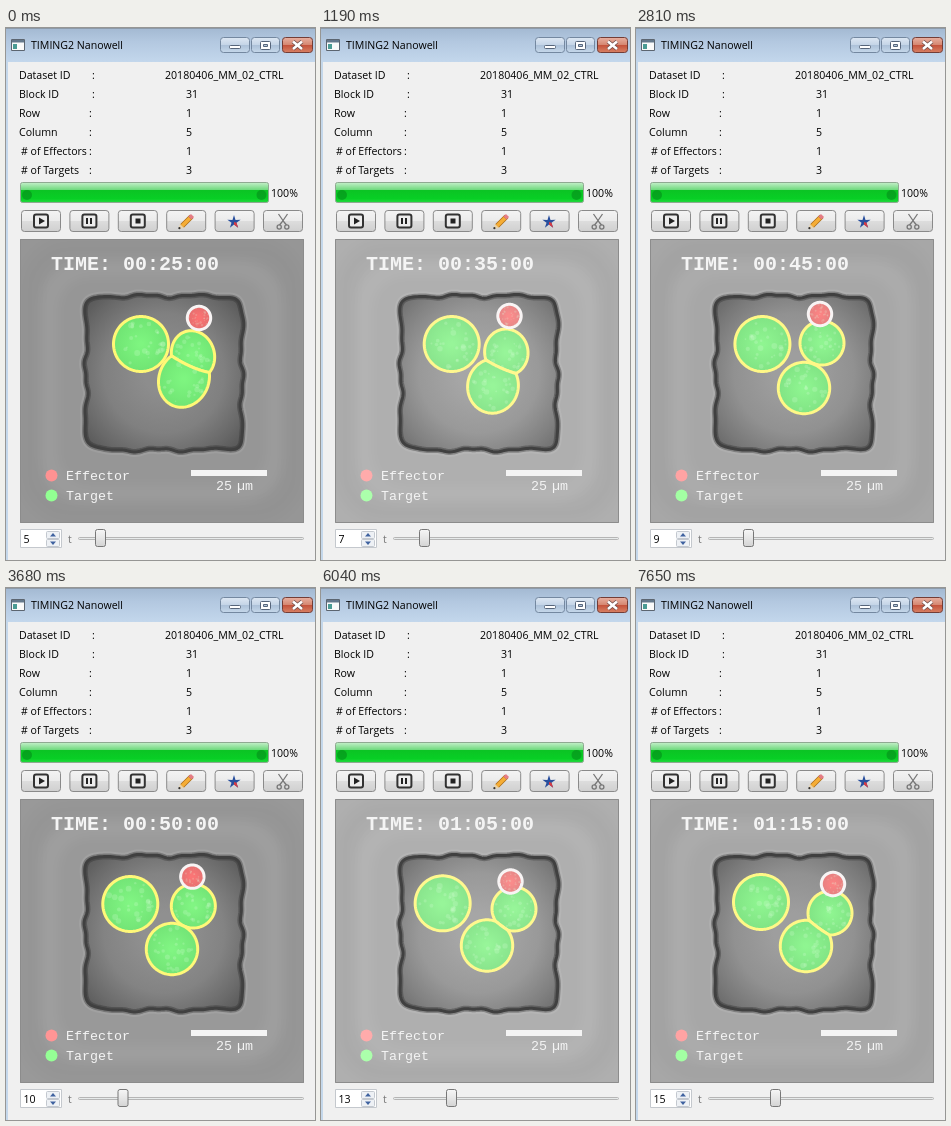
Write an HTML page with a canvas that moves like this. It is 309x532 px and loops after 8000 ms.

```html
<!DOCTYPE html>
<html lang="en">
<head>
<meta charset="utf-8">
<title>Nanowell viewer</title>
<style>
  html, body { margin: 0; width: 100%; height: 100%; overflow: hidden; background: #f0f0f0; }
  canvas { display: block; width: 309px; height: 532px; }
</style>
</head>
<body>
<canvas id="stage"></canvas>
<script>
const W = 309, H = 532, LOOP = 8000;
const canvas = document.getElementById('stage');
const ctx = canvas.getContext('2d');
const ratio = window.devicePixelRatio || 1;
canvas.width = W * ratio;
canvas.height = H * ratio;

const UI = '10.6px "Open Sans", sans-serif';
const mono = (size, weight = '') => `${weight} ${size}px "Liberation Mono", monospace`;

// Playback starts inside t = 5, then alternates a short and a long hold.
const FIRST_T = 5, FIRST_HOLD = 450, SHORT_HOLD = 740, PAIR = 1615;

// Cells drift along waypoints [t, x, y]; tilt is the lean while pressed together.
const targets = [
  { r: 27.5, tilt: 0, path: [[5, 135, 316], [12, 120, 316], [15, 125, 314]] },
  { r: 22, tilt: -18, path: [[5, 187, 327], [6, 185, 329], [9, 186, 315], [12, 190, 324], [14, 196, 318], [15, 194, 325]] },
  { r: 25.7, tilt: 22, path: [[5, 178, 351], [6, 174, 357], [12, 162, 363], [14, 170, 352], [15, 170, 358]] }
];
const effector = { r: 11.7, tilt: 0, path: [[5, 193, 290], [9, 184, 286], [12, 191, 294], [14, 188, 293], [15, 197, 296]] };

const clamp01 = v => Math.min(1, Math.max(0, v));

function along(path, t) {
  const i = path.findIndex(p => p[0] >= t);
  if (i < 1) return path.at(i).slice(1);
  const [a, b] = [path[i - 1], path[i]], u = (t - a[0]) / (b[0] - a[0]);
  return [a[1] + (b[1] - a[1]) * u, a[2] + (b[2] - a[2]) * u];
}

// Ellipse [cx, cy, rx, ry, degrees]; tilted cells relax into circles.
function pose({ r, tilt, path }, t) {
  const pressed = tilt ? clamp01((8 - t) / 2) : 0;
  return [...along(path, t), r * (1 - 0.03 * pressed), r * (1 + 0.12 * pressed), tilt * pressed];
}

// The exposure swings slowly between darker and lighter.
const exposure = t => Math.round(160 + 15 * Math.cos((t - 7.7) * Math.PI / 3));

function timePoint(now) {
  const s = now - FIRST_HOLD;
  if (s < 0) return FIRST_T;
  return FIRST_T + 1 + 2 * Math.floor(s / PAIR) + (s % PAIR >= SHORT_HOLD ? 1 : 0);
}

function seeded(seed) {
  return () => (seed = (seed * 16807) % 2147483647) / 2147483647;
}

const level = v => `rgb(${v},${v},${v})`;

function text(string, x, y, font = UI, color = '#000') {
  ctx.font = font;
  ctx.fillStyle = color;
  ctx.fillText(string, x, y);
}

function box(x, y, w, h, fill, stroke, radius = 0, width = 1) {
  ctx.beginPath();
  ctx.roundRect(x, y, w, h, radius);
  if (fill) { ctx.fillStyle = fill; ctx.fill(); }
  if (stroke) { ctx.strokeStyle = stroke; ctx.lineWidth = width; ctx.stroke(); }
}

function vertical(y0, y1, ...stops) {
  const g = ctx.createLinearGradient(0, y0, 0, y1);
  stops.forEach(([at, color]) => g.addColorStop(at, color));
  return g;
}

function polygon(points) {
  const path = new Path2D();
  points.forEach(([x, y]) => path.lineTo(x, y));
  path.closePath();
  return path;
}

function shape(color, ...points) {
  ctx.fillStyle = color;
  ctx.fill(polygon(points));
}

function disc(x, y, r, color) {
  ctx.beginPath();
  ctx.arc(x, y, r, 0, 7);
  ctx.fillStyle = color;
  ctx.fill();
}

function line(color, width, ...points) {
  ctx.beginPath();
  points.forEach(([x, y]) => ctx.lineTo(x, y));
  ctx.strokeStyle = color;
  ctx.lineWidth = width;
  ctx.stroke();
}

// Closed outline from a radius given as a function of the angle.
function polarPath(cx, cy, radius, steps = 120) {
  return polygon(Array.from({ length: steps }, (_, i) => {
    const a = i * 2 * Math.PI / steps, r = radius(a);
    return [cx + r * Math.cos(a), cy + r * Math.sin(a)];
  }));
}

// A nearly square superellipse with slightly wavy walls.
const wellPath = polarPath(158, 345, a => {
  const square = (Math.abs(Math.cos(a) / 78) ** 13 + Math.abs(Math.sin(a) / 77) ** 13) ** (-1 / 13);
  return square + 1.5 * Math.cos(10 * (a + 1.81)) + 0.7 * Math.cos(23 * a);
}, 360);

// Below 1 inside the ellipse, 1 on its outline.
function reach([cx, cy, rx, ry, degrees], x, y) {
  const a = degrees * Math.PI / 180, dx = x - cx, dy = y - cy;
  return Math.hypot((dx * Math.cos(a) + dy * Math.sin(a)) / rx, (dy * Math.cos(a) - dx * Math.sin(a)) / ry);
}

// Ellipse outline, flattened where it presses against its neighbours.
function cellPath(cell, others = []) {
  const [cx, cy] = cell;
  return polarPath(cx, cy, a => {
    const at = d => [cx + d * Math.cos(a), cy + d * Math.sin(a)];
    let r = 1 / reach(cell, ...at(1));
    for (const other of others) {
      const crosses = d => reach(other, ...at(d)) < reach(cell, ...at(d));
      if (!crosses(r)) continue;
      let low = 0, high = r;
      for (let n = 0; n < 14; n++) {
        const mid = (low + high) / 2;
        if (crosses(mid)) high = mid; else low = mid;
      }
      r = low;
    }
    return r;
  });
}

function drawTitleBar() {
  box(0, 0, W, 34, vertical(0, 34, [0, '#a3b9d2'], [0.4, '#b3c8e0'], [1, '#c3d7ec']));
  box(0, 0, W, 1, '#8d9aa8');
  box(0, 34, 2, H, '#c4d7ea');
  box(5.5, 11.5, 13, 11, '#fafafa', '#5c6570');
  box(6, 12, 12, 2.5, '#64788c');
  box(7, 16, 4, 5, '#4b9b94');
  text('TIMING2 Nanowell', 25, 21);
  const glass = vertical(9, 25, [0, '#dfe9f4'], [0.48, '#c5d5e7'], [0.5, '#abc0d8'], [1, '#c8daec']);
  const red = vertical(9, 25, [0, '#e9b3a5'], [0.48, '#d68872'], [0.5, '#c4513a'], [1, '#d98467']);
  box(214.5, 9.5, 29, 15, glass, '#7488a0', 3);
  box(245.5, 9.5, 28, 15, glass, '#7488a0', 3);
  box(276.5, 9.5, 30, 15, red, '#733d36', 3);
  box(223.5, 17.5, 11, 3, '#fff', '#56657a', 1);
  box(254.5, 13.5, 10, 8, '#fff', '#56657a', 1);
  box(257.5, 16.5, 4, 2, '#b5c8dc', '#56657a');
  [['#6d4a48', 4.2], ['#fff', 2.6]].forEach(([color, width]) => {
    line(color, width, [287, 13.5], [296, 21]);
    line(color, width, [296, 13.5], [287, 21]);
  });
}

function drawDetails() {
  [['Dataset ID', '20180406_MM_02_CTRL'], ['Block ID', '31'], ['Row', '1'],
   ['Column', '5'], ['# of Effectors', '1'], ['# of Targets', '3']
  ].forEach(([label, value], i) => {
    const y = 51 + i * 18.9;
    text(label, label[0] === '#' ? 15 : 13, y);
    text(':', i < 2 ? 86 : 83, y);
    text(value, value.length > 2 ? 159 : 180, y);
  });
  box(14.5, 154.5, 248, 20,
    vertical(154, 175, [0, '#c9f0ce'], [0.36, '#72da80'], [0.4, '#0bc424'], [0.8, '#08cf25'], [1, '#2ada45']), '#8fa991', 2);
  disc(21, 167, 5, 'rgba(0,110,20,.4)');
  disc(255.5, 167, 5, 'rgba(0,110,20,.4)');
  text('100%', 265, 169);
}

function drawToolbar() {
  const face = vertical(182, 204, [0, '#f4f4f4'], [0.48, '#ebebeb'], [0.5, '#dddddd'], [1, '#cfcfcf']);
  for (let i = 0; i < 6; i++) box(15.5 + i * 48.4, 182.5, 39, 21, face, '#8a8a8a', 3);
  for (let i = 0; i < 3; i++) box(28 + i * 48.4, 186.5, 14, 13, '#ededed', '#333', 2, 2);
  shape('#222', [33, 189.5], [39, 193], [33, 196.5]);
  box(80, 190, 2, 6, '#222');
  box(84, 190, 2, 6, '#222');
  box(129.5, 190.5, 5, 5, '#222');

  line('#a86b16', 5.2, [176, 198], [185.5, 188.5]);
  line('#f5ad35', 3.8, [176, 198], [184, 190]);
  line('#e57d86', 4.4, [184, 190], [186.5, 187.5]);
  shape('#ecd3a6', [174, 196], [178, 200], [172.5, 201]);
  disc(173.4, 200.2, 1.1, '#333');

  const star = Array.from({ length: 10 }, (_, i) => {
    const a = i * Math.PI / 5 - Math.PI / 2, r = i % 2 ? 2.6 : 7;
    return [228 + r * Math.cos(a), 194 + r * Math.sin(a)];
  });
  shape('#284f9e', ...star);
  shape('#d83a42', [228, 194], ...star.slice(3, 6));

  for (const side of [-1, 1]) {
    line('#777', 1.3, [277 - 4.5 * side, 186], [277 + side, 194], [277 + 3.5 * side, 197]);
    ctx.beginPath();
    ctx.arc(277 + 3.8 * side, 199, 2.1, 0, 7);
    ctx.stroke();
  }
}

function drawWell(g) {
  box(14, 211, 284, 284, level(g + 4));
  ctx.save();
  ctx.beginPath();
  ctx.rect(14, 211, 284, 284);
  ctx.clip();
  ctx.filter = 'blur(7px)';
  box(43, 240, 226, 226, null, 'rgba(255,255,255,.08)', 40, 14);
  box(24, 221, 264, 264, null, 'rgba(0,0,0,.03)', 40, 14);
  ctx.filter = 'none';
  const rim = (color, width) => {
    ctx.strokeStyle = color;
    ctx.lineWidth = width;
    ctx.stroke(wellPath);
  };
  rim('rgba(255,255,255,.08)', 10);
  const floor = ctx.createRadialGradient(158, 345, 20, 158, 345, 100);
  [[0, 5], [0.5, 18], [0.85, 42], [1, 54]].forEach(([at, darker]) => floor.addColorStop(at, level(g - darker)));
  ctx.fillStyle = floor;
  ctx.fill(wellPath);
  rim('rgba(40,40,40,.35)', 6);
  rim('#404040', 3);
  ctx.restore();
}

function fillCell(path, [cx, cy, rx, ry], [inner, outer], edge, seed) {
  const glow = ctx.createRadialGradient(cx, cy, 2, cx, cy, Math.max(rx, ry) * 1.1);
  glow.addColorStop(0, inner);
  glow.addColorStop(1, outer);
  ctx.fillStyle = glow;
  ctx.fill(path);
  const random = seeded(seed);
  ctx.save();
  ctx.clip(path);
  for (let i = 0; i < 26; i++) {
    const a = random() * 7, d = Math.sqrt(random()) * 0.85;
    disc(cx + rx * d * Math.cos(a), cy + ry * d * Math.sin(a), rx * (0.03 + random() * 0.08), 'rgba(225,255,225,.2)');
  }
  ctx.restore();
  ctx.strokeStyle = edge;
  ctx.lineWidth = 3;
  ctx.stroke(path);
}

function drawCells(t, g) {
  const cells = targets.map(cell => pose(cell, t));
  const green = [`rgb(${g - 20},245,${g - 18})`, `rgb(${g - 36},226,${g - 32})`];
  cells.forEach((cell, i) => {
    const path = cellPath(cell, cells.filter(other => other !== cell));
    fillCell(path, cell, green, `rgb(255,248,${g - 28})`, 101 + 977 * i + 31 * t);
  });
  const red = pose(effector, t);
  fillCell(cellPath(red), red, [`rgb(250,${g - 32},${g - 32})`, `rgb(226,${g - 36},${g - 36})`], '#f8f4f4', 700 + t);
}

function drawOverlay(t, g) {
  const minutes = t * 5, two = n => String(n).padStart(2, '0');
  const white = '#f4f4f4', small = mono(13.33);
  text(`TIME: ${two(Math.floor(minutes / 60))}:${two(minutes % 60)}:00`, 45, 242, mono(20, 'bold'), white);
  disc(45.5, 447.5, 6, `rgb(255,${g},${g})`);
  disc(45.5, 467.5, 6, `rgb(${g},255,${g})`);
  text('Effector', 60, 452, small, white);
  text('Target', 60, 472, small, white);
  box(185, 442, 76, 6, white);
  text('25', 210, 462, small, white);
  text('µm', 231, 462, small, white);
  box(14.5, 211.5, 283, 283, null, '#8c8c8c');
}

function drawSlider(t) {
  box(14.5, 501.5, 41, 18, '#fff', '#c4c8cd');
  text(t, 17.5, 515);
  for (const side of [-1, 1]) {
    const y = 511 + 4 * side;
    box(40.5, y - 3.5, 13, 7, '#eef1f5', '#c3c8cf', 1);
    shape('#3f62a0', [44, y - 1.5 * side], [47, y + 2 * side], [50, y - 1.5 * side]);
  }
  text('t', 62, 515, UI, '#777');
  box(72.5, 509.5, 225, 2, '#e7eaea', '#b5b5b5', 1);
  const x = 89.5 + (t - FIRST_T) * 4.5;
  box(x, 501.5, 10, 17, vertical(501, 519, [0, '#f7f7f7'], [0.5, '#e6e6e6'], [1, '#d2d2d2']), '#777', 2);
}

function draw(t) {
  const g = exposure(t);
  ctx.setTransform(ratio, 0, 0, ratio, 0, 0);
  ctx.lineJoin = 'round';
  box(0, 0, W, H, '#f0f0f0');
  drawTitleBar();
  drawDetails();
  drawToolbar();
  drawWell(g);
  drawCells(t, g);
  drawOverlay(t, g);
  drawSlider(t);
}

let shown = null;
function tick() {
  const t = timePoint(performance.now() % LOOP);
  if (t !== shown) draw(shown = t);
  requestAnimationFrame(tick);
}
tick();
</script>
</body>
</html>
```
